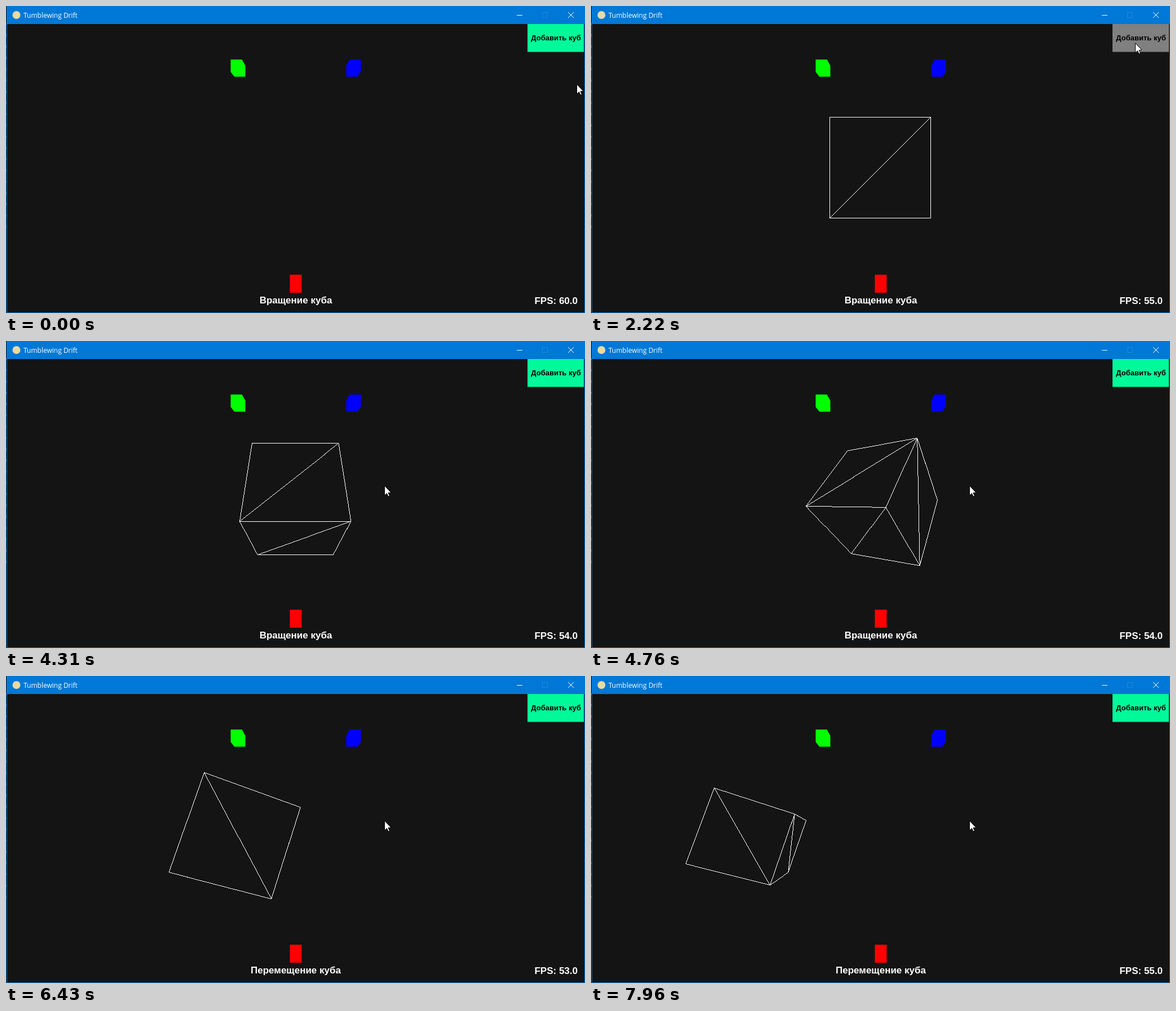
An HTML page with a canvas that plays this animation: 1027x545 px, repeating every 8 s.

```html
<!DOCTYPE html>
<html lang="ru">
<head>
<meta charset="utf-8">
<style>
html, body { margin: 0; height: 100%; overflow: hidden; background: #141414; }
canvas { display: block; }
</style>
</head>
<body>
<canvas id="stage" width="1027" height="545"></canvas>
<script>
const ctx = document.getElementById('stage').getContext('2d');
const LOOP = 8000, TICK = 63.6;           // ms
const TURN = 0.0965 * Math.PI / 180;      // radians per ms while a key is held
const MOVE = 0.00264;                     // cube units per ms while a key is held
const FOCAL = 358, CX = 513.2, CY = 287.2;
const BOLD = '"Liberation Sans", Arial, sans-serif';

// Time a key pressed from start to end has been down so far
const held = (t, start, end) => Math.min(Math.max(t - start, 0), end - start);
const ease = (t, start, end) => {
  const k = held(t, start, end) / (end - start);
  return k * k * (3 - 2 * k);
};

function cubePose(t) {
  return {
    pitch: TURN * (held(t, 4000, 4435) - held(t, 4920, 5170)),
    yaw: TURN * (held(t, 4435, 4865) + held(t, 5210, 5590)),
    center: [-MOVE * (held(t, 5920, 7132) + held(t, 7735, 7950)), 0, 5 + MOVE * held(t, 7270, 7728)]
  };
}

function mouse(t) {
  const enter = ease(t, 0, 820), wander = ease(t, 1080, 1840), leave = ease(t, 2240, 2980);
  const swing = Math.sin(Math.PI * wander);
  return [
    Math.round(1012 - 27 * enter - 20 * wander - 36 * swing - 294 * leave),
    Math.round(139 - 73 * enter + 70 * swing + 191 * leave)
  ];
}

function frameRate(t) {
  if (t < 1930) return 60;
  if (t < 2600) return 55;
  if (t < 4040) return 20 + 15 * (t > 3660);
  return t < 5000 ? 54 : t < 7300 ? 53 : 55;
}

function rect(color, x, y, w, h) {
  ctx.fillStyle = color;
  ctx.fillRect(x, y, w, h);
}
function polygon(color, points) {
  ctx.beginPath();
  points.forEach(p => ctx.lineTo(...p));
  ctx.closePath();
  ctx.fillStyle = color;
  ctx.fill();
}
function text(str, x, y, color, font, align = 'center') {
  ctx.font = font;
  ctx.textAlign = align;
  ctx.fillStyle = color;
  ctx.fillText(str, x, y);
}
// Hard-edged one pixel line
function line([x0, y0], [x1, y1]) {
  const n = Math.ceil(Math.max(Math.abs(x1 - x0), Math.abs(y1 - y0), 1));
  for (let i = 0; i <= n; i++)
    ctx.fillRect(Math.floor(x0 + (x1 - x0) * i / n), Math.floor(y0 + (y1 - y0) * i / n), 1, 1);
}

function drawCube({ pitch, yaw, center }) {
  const [sa, ca, sb, cb] = [Math.sin(pitch), Math.cos(pitch), Math.sin(yaw), Math.cos(yaw)];
  const axes = [[-sa * sb, ca, -sa * cb], [cb, 0, -sb], [-ca * sb, -sa, -ca * cb]];
  const project = signs => {
    const [x, y, z] = center.map((c, i) => c + signs.reduce((sum, s, k) => sum + s * axes[k][i], 0));
    return [CX + FOCAL * x / z, CY + FOCAL * y / z];
  };

  ctx.fillStyle = '#fff';
  for (let k = 0; k < 3; k++) for (const side of [-1, 1]) {
    const facing = axes[k].reduce((sum, n, i) => sum + side * n * (center[i] + side * n), 0);
    if (facing >= 0) continue;
    const corner = (u, v) => {
      const signs = [];
      signs[k] = side;
      signs[(k + 1) % 3] = u;
      signs[(k + 2) % 3] = v;
      return project(signs);
    };
    const quad = [corner(1, 1), corner(1, -1), corner(-1, -1), corner(-1, 1)];
    quad.forEach((p, i) => line(p, quad[(i + 1) % 4]));
    const first = k === 0 ? 0 : 1;
    line(quad[first], quad[first + 2]);
  }
}

function drawWindow() {
  rect('#141414', 0, 0, 1027, 545);
  for (let y = 30; y < 410; y += 20) rect(y < 130 ? '#36479a' : '#285048', 0, y, 1, 4);
  ctx.lineWidth = 1;
  ctx.strokeStyle = '#0078d7';
  ctx.strokeRect(1.5, 0.5, 1025, 544);
  rect('#0078d7', 1, 1, 1025, 31);
  ctx.beginPath();
  ctx.arc(18.5, 16, 7, 0, 7);
  ctx.fillStyle = '#e6dba4';
  ctx.fill();
  text('Tumblewing Drift', 31, 21, '#fff', '12px "Open Sans", "Noto Sans", sans-serif', 'left');
  rect('#fff', 906, 16, 10, 1);
  ctx.strokeStyle = '#2687d6';
  ctx.strokeRect(951.5, 11.5, 9, 9);
  ctx.strokeStyle = '#fff';
  ctx.beginPath();
  ctx.moveTo(997, 11); ctx.lineTo(1007, 21);
  ctx.moveTo(1007, 11); ctx.lineTo(997, 21);
  ctx.stroke();
}

function drawMarkers() {
  const side = [[398.5, 95], [418.5, 95], [424.5, 106], [424.5, 125.5], [405, 125.5], [398.5, 117]];
  polygon('#0f0', side);
  polygon('#00f', side.map(([x, y]) => [1028 - x, y]));
  rect('#f00', 503.5, 477, 21, 32);
}

function drawCursor([x, y]) {
  const arrow = [[0.5, 0], [0.5, 17], [4.5, 13.5], [7, 19], [9.5, 18], [7, 12.5], [12, 12]];
  polygon('#fff', arrow.map(([dx, dy]) => [x + dx, y + dy]));
  ctx.strokeStyle = '#000';
  ctx.stroke();
}

function draw(time) {
  const t = Math.floor((time % LOOP + 20) / TICK) * TICK;
  drawWindow();
  drawMarkers();
  if (t > 1930) drawCube(cubePose(t));
  rect(t > 660 && t < 2300 ? '#808080' : '#00fa9a', 925, 32, 100, 49.5);
  text('Добавить куб', 975.5, 61, '#000', 'bold 13px ' + BOLD);
  text(t < 5700 ? 'Вращение куба' : 'Перемещение куба', 514, 528, '#fff', 'bold 17px ' + BOLD);
  text(`FPS: ${frameRate(t)}.0`, 1014, 529, '#fff', 'bold 17px ' + BOLD, 'right');
  drawCursor(mouse(t));
}

function loop() {
  draw(performance.now());
  requestAnimationFrame(loop);
}
loop();
</script>
</body>
</html>
```
